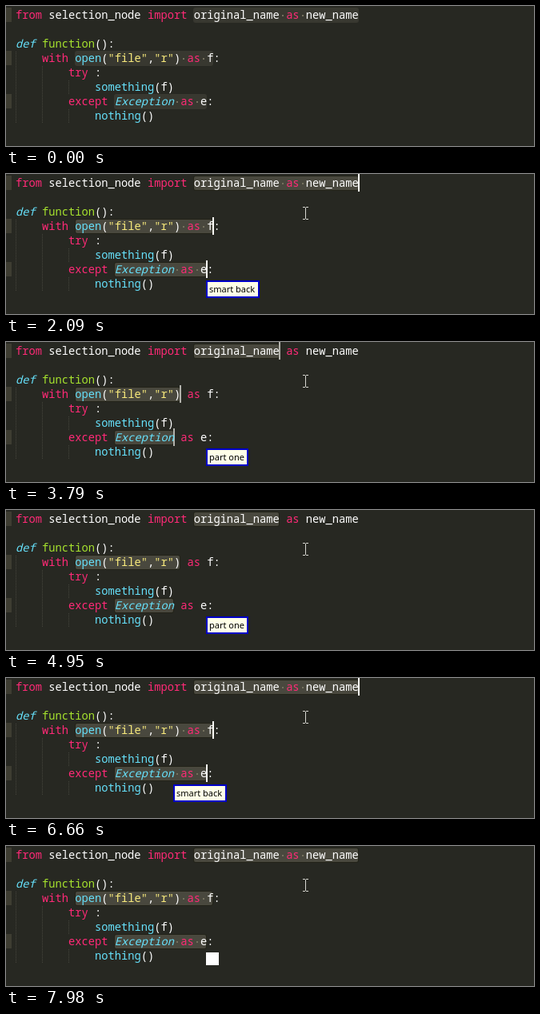
An HTML page with a canvas that plays this animation: 660 px wide and 175 px high, repeating every 8 s.

```html
<!DOCTYPE html>
<html>
<head>
<meta charset="utf-8">
<style>
html, body { margin: 0; width: 660px; height: 175px; overflow: hidden; background: #272822; }
canvas { display: block; }
</style>
</head>
<body>
<canvas id="stage" width="660" height="175"></canvas>
<script>
const ctx = document.getElementById('stage').getContext('2d');
const LOOP = 8000, LEFT = 12, CHAR = 8.247, ROW = 18;
const MONO = '500 13.745px "Noto Sans Mono", monospace';
const WHITE = '#ffffff', PINK = '#ff2a77', BLUE = '#66e0fa', YELLOW = '#f8ea7c', GREEN = '#a6e22e';

// Each token: row, column, text, colour, italic
const code = [
  [0, 0, 'from', PINK], [0, 5, 'selection_node', WHITE], [0, 20, 'import', PINK],
  [0, 27, 'original_name', WHITE], [0, 41, 'as', PINK], [0, 44, 'new_name', WHITE],
  [2, 0, 'def', BLUE, true], [2, 4, 'function', GREEN], [2, 12, '():', WHITE],
  [3, 4, 'with', PINK], [3, 9, 'open', BLUE], [3, 13, '(', WHITE], [3, 14, '"file"', YELLOW],
  [3, 20, ',', WHITE], [3, 21, '"r"', YELLOW], [3, 24, ')', WHITE], [3, 26, 'as', PINK], [3, 29, 'f:', WHITE],
  [4, 8, 'try', PINK], [4, 12, ':', WHITE],
  [5, 12, 'something', BLUE], [5, 21, '(f)', WHITE],
  [6, 8, 'except', PINK], [6, 15, 'Exception', BLUE, true], [6, 25, 'as', PINK], [6, 28, 'e:', WHITE],
  [7, 12, 'nothing', BLUE], [7, 19, '()', WHITE],
];

// Selected columns per row: start, end of the first part, end of the whole
const selections = [
  { row: 0, from: 27, part: 40, whole: 52 },
  { row: 3, from: 9, part: 25, whole: 30 },
  { row: 6, from: 15, part: 24, whole: 29 },
];

// Caret fades: first step, last step, step count, final opacity
const fades = [
  [930, 930, 1, 1], [1140, 1390, 4, 0], [1860, 2090, 3, 1], [2170, 2470, 4, 0],
  [2700, 3010, 5, 1], [3160, 3160, 1, 0], [3330, 3330, 1, 1], [3710, 3880, 3, 0],
  [4340, 4490, 3, 1], [4800, 4950, 3, 0], [5350, 5500, 3, 1], [5660, 5880, 3, 0],
  [6360, 6360, 1, 1], [6830, 6970, 2, 0], [7350, 7440, 2, 1], [7750, 7980, 4, 0],
];

// Speech popup: time, x, text (an empty text shows the plain badge)
const popups = [
  [2090, 250, 'smart back'], [2320, 250, ''], [3010, 250, 'part one'], [5430, 209, 'part one'],
  [5660, 209, ''], [6040, 209, 'smart back'], [7750, 250, 'smart back'], [7980, 250, ''],
];

const colX = col => LEFT + col * CHAR;
const latest = (list, t) => list.filter(item => item[0] <= t).pop();
const within = (t, a, b) => t >= a && t < b;

function rect(x, y, w, h, color) {
  ctx.fillStyle = color;
  ctx.fillRect(x, y, w, h);
}

function roundRect(x, y, w, h, radius, color) {
  ctx.fillStyle = color;
  ctx.beginPath();
  ctx.roundRect(x, y, w, h, radius);
  ctx.fill();
}

function caretOpacity(t) {
  const fade = latest(fades, t);
  if (!fade) return 0;
  const [start, end, steps, target] = fade;
  const gap = (end - start) / (steps - 1 || 1);
  const done = t >= end ? 1 : (Math.floor((t - start) / gap) + 1) / steps;
  return target ? done : 1 - done;
}

function drawSelections(t) {
  const end = within(t, 3160, 6190) ? 'part' : 'whole';
  const dim = t < 930 || within(t, 3160, 3330) || within(t, 6190, 6360);
  for (const s of selections) {
    const x = Math.floor(colX(s.from)), y = 2 + s.row * ROW;
    const width = Math.round(colX(s[end])) - x;
    rect(0, y, 7, 18, '#3e3d32');
    roundRect(x, y, width, 19, 3, dim ? '#383830' : '#222218');
    if (!dim) roundRect(x + 1, y + 1, width - 2, 17, 2, '#49483e');
    if (end === 'whole') {
      for (const col of [s.part, s.part + 3]) {
        rect(Math.round(colX(col + 0.5)) - 1, y + 9, 2, 2, '#75715e');
      }
    }
  }
  ctx.globalAlpha = caretOpacity(t);
  for (const s of selections) rect(Math.round(colX(s[end])) - 1, s.row * ROW, 2, 22, '#f8f8f2');
  ctx.globalAlpha = 1;
}

function drawGuides() {
  for (const [col, rows] of [[0, [3, 4, 5, 6, 7]], [4, [4, 5, 6, 7]], [8, [5, 7]]]) {
    for (const row of rows) {
      for (let y = 3; y < 21; y += 2) rect(Math.round(colX(col)), row * ROW + y, 1, 1, '#45453d');
    }
  }
}

function drawCode() {
  for (const [row, col, text, color, italic] of code) {
    ctx.font = (italic ? 'italic ' : '') + MONO;
    ctx.fillStyle = color;
    ctx.fillText(text, colX(col), 16 + row * ROW);
  }
}

function drawPointer() {
  for (const y of [41, 56]) {
    rect(371, y, 3, 1, '#d8d8d2');
    rect(375, y, 3, 1, '#d8d8d2');
  }
  rect(374, 42, 1, 14, '#d8d8d2');
}

function drawPopup(t) {
  const popup = latest(popups, t);
  if (!popup) return;
  const [, x, text] = popup;
  if (!text) return rect(x, 133, 16, 16, '#fff');
  const width = text === 'part one' ? 53 : 67;
  rect(x, 133, width, 22, '#0000c8');
  rect(x + 2, 135, width - 4, 18, '#ffffe8');
  ctx.font = '11px "Noto Sans", sans-serif';
  ctx.fillStyle = '#000';
  ctx.fillText(text, x + 4, 148);
}

function draw() {
  const t = performance.now() % LOOP;
  rect(0, 0, 660, 175, '#272822');
  drawGuides();
  drawSelections(t);
  drawCode();
  if (t >= 930) drawPointer();
  drawPopup(t);
  requestAnimationFrame(draw);
}
draw();
</script>
</body>
</html>
```
